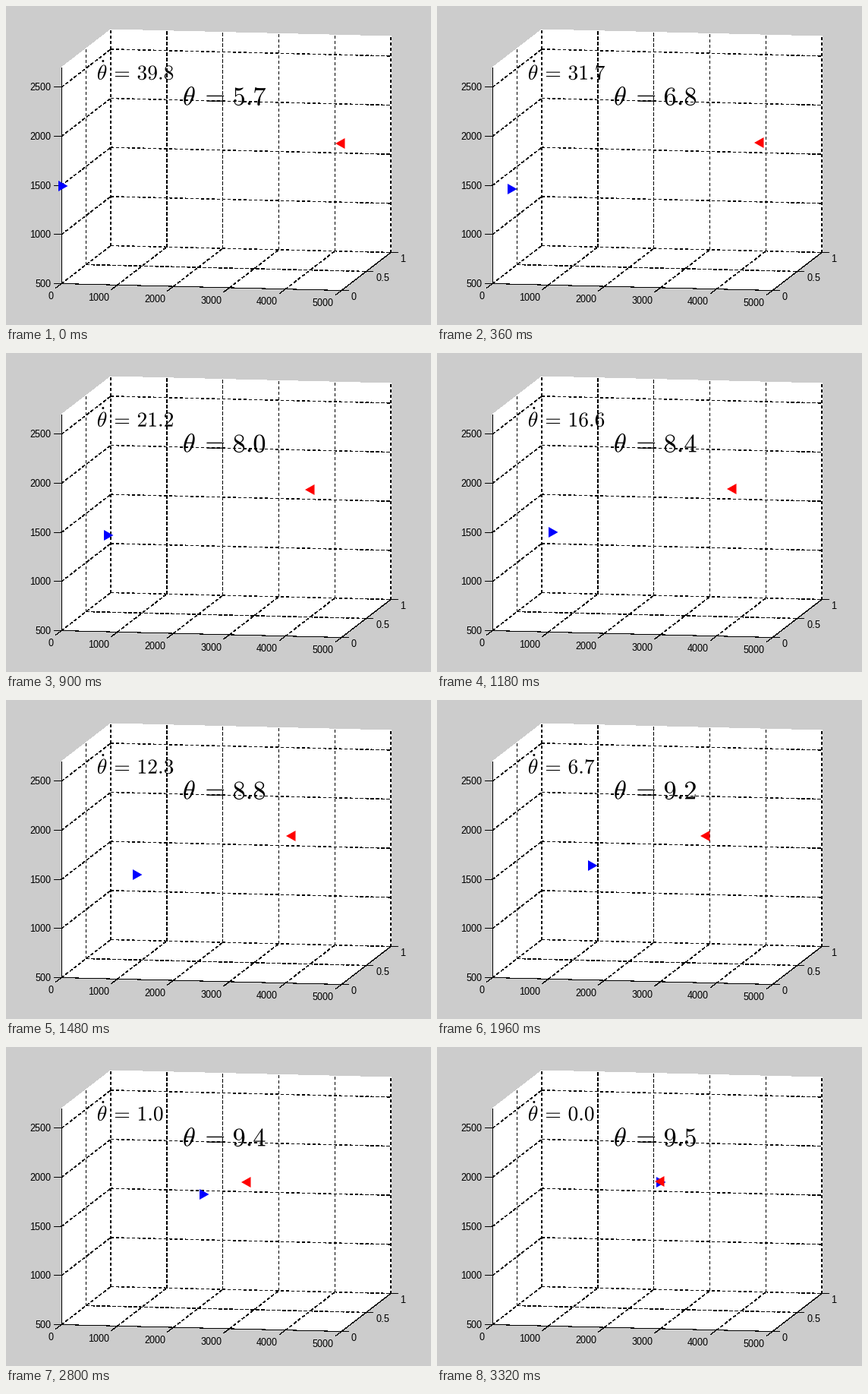
A matplotlib script that plays this animation: 560 by 420 pixels, repeating every 3.34 s.

```python
import math

import matplotlib.pyplot as plt
from matplotlib.animation import FuncAnimation
from matplotlib.patches import PathPatch, Polygon
from matplotlib.textpath import TextPath
from matplotlib.transforms import Affine2D

plt.rcParams.update({
    "mathtext.fontset": "cm",
    "lines.scale_dashes": False,
    "text.hinting": "native",
    "text.hinting_factor": 1,
})

W, H, DPI = 560, 420, 100
PX = 72 / DPI
FRAMES, STEP = 167, 20
HAIRLINE = 0.1 * PX  # aliased, so it fills one pixel
DASH = 3.2 * PX

# Screen projection of the 3D box: x, y and z in axis units 0..1
ORIGIN = (72.6, 365)
AX_X, AX_Y, AX_Z = (369, 9), (65, -50), (0, -284.5)


def project(x, y, z):
    return tuple(ORIGIN[i] + x * AX_X[i] + y * AX_Y[i] + z * AX_Z[i]
                 for i in (0, 1))


fig = plt.figure(figsize=(W / DPI, H / DPI), dpi=DPI, facecolor="#cccccc")
ax = fig.add_axes([0, 0, 1, 1])
ax.set_xlim(-0.5, W - 0.5)
ax.set_ylim(H - 0.5, -0.5)
ax.axis("off")


def line(p, q, dashed=False):
    ax.plot(*zip(p, q), color="black", lw=HAIRLINE, antialiased=False,
            snap=False, ls=(0, (DASH, DASH)) if dashed else "-",
            dash_capstyle="butt", solid_capstyle="butt", zorder=2)


def grid(p, q):
    line(project(*p), project(*q), dashed=True)


def tick(p, dx, dy):
    line(p, (p[0] + dx, p[1] + dy))


def label(x, y, text, ha):
    ax.text(x, y, text, ha=ha, va="baseline", family="Liberation Sans",
            size=13 * PX, color="black", zorder=3)


def math_path(text, x, y, size):
    flip = Affine2D().scale(1, -1).translate(x, y)
    return TextPath((0, 0), f"${text}$", size=size).transformed(flip)


def formula(text, x, y, size):
    patch = PathPatch(math_path(text, x, y, size), fc="black", lw=0, zorder=4)
    return ax.add_patch(patch)


def marker(color, zorder):
    return ax.add_patch(Polygon([(0, 0), (1, 0), (0, 1)], fc=color, lw=0,
                                snap=False, zorder=zorder))


def triangle(base, tip, y):
    return [(base, y - 7), (base, y + 7), (tip, y)]


walls = [(0, 0, 1), (0, 1, 1), (1, 1, 1), (1, 1, 0), (1, 0, 0), (0, 0, 0)]
ax.add_patch(Polygon([project(*p) for p in walls], fc="white", lw=0,
                     antialiased=False, snap=False, zorder=1))

for n in range(6):
    x = n / 5
    grid((x, 1, 0), (x, 1, 1))
    if 0 < n < 5:
        grid((x, 0, 0), (x, 1, 0))
    tick(project(x, 0, 0), -8, 6)
    label(62 + 73.9 * n, 386 + 1.7 * n, str(1000 * n), "right")

for n in range(5):
    z = 500 * n / 2200
    grid((0, 1, z), (1, 1, z))
    grid((0, 0, z), (0, 1, z))
    px, py = project(0, 0, z)
    tick((px, py), -10, 0)
    label(59, py + 4.5, str(500 + 500 * n), "right")

grid((0, 0.5, 0), (0, 0.5, 1))
grid((0, 0.5, 0), (1, 0.5, 0))
for n, text in enumerate(("0", "0.5", "1")):
    tick(project(1, n / 2, 0), 9, 0.3)
    label(454.5 + 32.3 * n, 386.5 - 25 * n, text, "left")

line(project(0, 0, 0), project(0, 0, 1))
line(project(0, 0, 0), project(1, 0, 0))
line(project(1, 0, 0), project(1, 1, 0))

RATE = dict(x=172, y=96.3, size=27.5)
ANGLE = dict(x=298, y=130, size=34.5)
formula(r"\dot{\theta}", 119.3, 96.3, 27.5)
formula("=", 137, 96.3, 27.5)
formula(r"\theta", 232.4, 130, 34.5)
formula("=", 255.8, 130, 34.5)
rate_text = formula("0", **RATE)
angle_text = formula("0", **ANGLE)
blue = marker("#0000ff", 5)
red = marker("#ff0000", 6)


def draw(k):
    u = 1 - k / 166.5
    rate = 39.8 * u ** 2
    angle = 9.455 - 3.75 * u ** 3
    rate_text.set_path(math_path(f"{rate:.1f}", **RATE))
    angle_text.set_path(math_path(f"{angle:.1f}", **ANGLE))

    # Markers land on whole pixels
    bx = math.floor(69.5 + 1.325 * k)
    by = math.floor(236.6 - 0.6075 * k + 41.6 * (1 - u ** 4))
    blue.set_xy(triangle(bx - 0.5, bx + 12, by + 0.5))
    rx = math.floor(434.5 - 0.883 * k)
    ry = math.floor(180.2 - 0.0217 * k)
    red.set_xy(triangle(rx + 12, rx - 0.5, ry + 0.5))
    return rate_text, angle_text, blue, red


anim = FuncAnimation(fig, draw, frames=FRAMES, interval=STEP, repeat=True,
                     repeat_delay=0)
plt.show()
```
